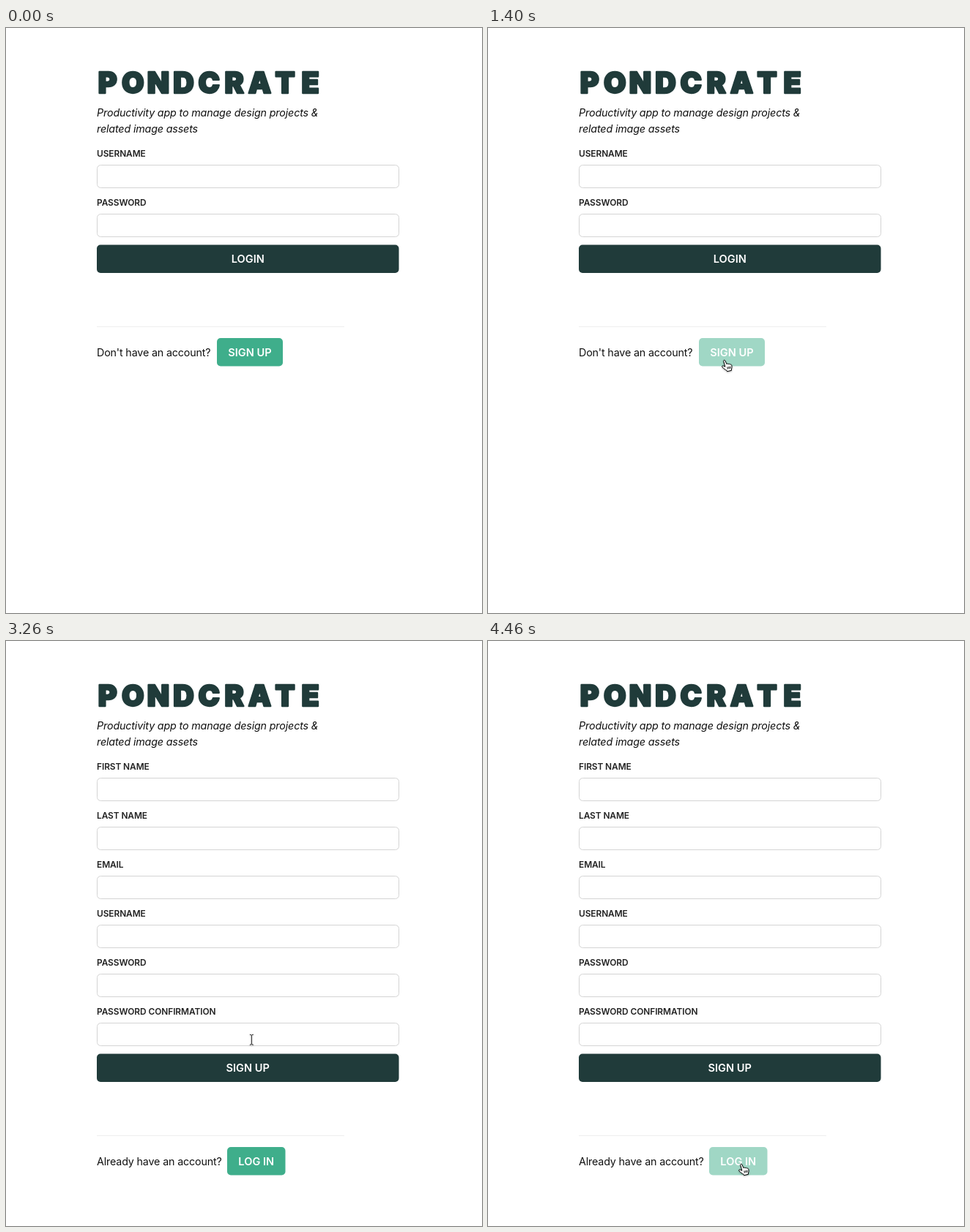
An HTML page for the animation above (4.62 s loop, 650 px wide and 800 px high).

```html
<!DOCTYPE html>
<html lang="en">
<head>
<meta charset="utf-8">
<title>Sign in</title>
<style>
html, body { margin: 0; width: 100%; height: 100%; overflow: hidden; background: #fff; }
svg { display: block; width: 650px; height: 800px; font-family: Inter, "Open Sans", sans-serif; cursor: default; }
.title { font-weight: 900; font-size: 39.5px; text-anchor: middle; fill: #203b3a; stroke: #203b3a; stroke-width: 2.4; stroke-linejoin: round; }
.body { font-size: 14.3px; letter-spacing: -0.16px; fill: #111; }
.tagline { font-style: italic; }
.label { font-size: 11.9px; font-weight: 600; letter-spacing: -0.07px; fill: #222; }
.field { fill: #fff; stroke: #d4d4d4; }
.action { font-size: 14.6px; font-weight: 600; text-anchor: middle; fill: #fff; }
.rule { stroke: #eee; }
.hover { opacity: 0.49; }
</style>
</head>
<body>
<svg id="stage" viewBox="0 0 650 800"></svg>
<script>
const LOOP = 4620, STEP = 20;
const ENTER = 660, CLICK = 2060, SWAP = 2100;
const stage = document.getElementById('stage');

function add(parent, tag, attrs, text) {
  const el = document.createElementNS('http://www.w3.org/2000/svg', tag);
  for (const k in attrs) el.setAttribute(k, attrs[k]);
  if (text) el.textContent = text;
  parent.appendChild(el);
  return el;
}

function write(parent, cls, x, y, text) {
  return add(parent, 'text', { class: cls, x, y }, text);
}

function button(parent, x, y, width, fill, text) {
  const height = 38.5, el = add(parent, 'g', {});
  add(el, 'rect', { x, y, width, height, rx: 5, fill });
  write(el, 'action', x + width / 2, y + 24.8, text);
  return { el, x, y, width, height };
}

function buildPage(labels, submit, prompt, link, linkX, linkWidth) {
  const el = add(stage, 'g', {}), end = labels.length * 67;
  const fields = labels.map((label, i) => {
    const box = { x: 124.5, y: 187.5 + 67 * i, width: 412, height: 31 };
    write(el, 'label', 124, 175.7 + 67 * i, label);
    add(el, 'rect', { ...box, rx: 5, class: 'field' });
    return box;
  });
  add(el, 'line', { class: 'rule', x1: 124, x2: 462, y1: end + 274.5, y2: end + 274.5 });
  write(el, 'body', 124, end + 314.8, prompt);
  const buttons = [
    button(el, 124, end + 162.5, 412.5, '#203b3a', submit),
    button(el, linkX, end + 290, linkWidth, '#3fae8b', link)
  ];
  return { el, fields, buttons };
}

// Heading: each letter is centred in an equal cell
const name = 'PONDCRATE';
add(stage, 'text', { class: 'title', y: 89, x: [...name].map((c, i) => 138.8 + 34.6 * i).join(' ') }, name);
write(stage, 'body tagline', 124, 120.8, 'Productivity app to manage design projects &');
write(stage, 'body tagline', 124, 142.8, 'related image assets');

const login = buildPage(['USERNAME', 'PASSWORD'], 'LOGIN',
  "Don't have an account?", 'SIGN UP', 288, 90);
const signup = buildPage(
  ['FIRST NAME', 'LAST NAME', 'EMAIL', 'USERNAME', 'PASSWORD', 'PASSWORD CONFIRMATION'],
  'SIGN UP', 'Already have an account?', 'LOG IN', 302, 79.5);

// Pointer shapes, each with its hot spot at 0,0
const pointer = add(stage, 'g', { style: 'filter: drop-shadow(0 1px 1px rgba(0,0,0,.3))' });
const shapes = {
  arrow: add(pointer, 'path', {
    d: 'M0 0V11.8L2.7 9.2L4.6 13.7L6.5 12.9L4.6 8.5H8.4Z',
    fill: '#000', stroke: '#fff', 'stroke-width': 1.4, 'paint-order': 'stroke'
  }),
  hand: add(pointer, 'path', {
    transform: 'translate(-4 -1.3)',
    d: 'M2.7 1.9C2.3 .5 4.3 -.1 4.9 1.3L6.8 5.9C7.4 5.1 8.8 5.1 9.2 6.1C10 5.4 11.2 5.6 11.6 6.5' +
       'C12.5 6 13.6 6.6 13.8 7.8C14.2 10 14 11.8 13.3 13.3L13.5 14.6L7.6 16L7 14.6' +
       'C5 13.8 3 12 1 10.2C0 9 1 7.8 2.3 8.3L4.9 9.6Z' +
       'M7.8 9.8L8.4 12.8M9.7 9.4L10.3 12.4M11.6 9L12.1 12',
    fill: '#fff', stroke: '#000', 'stroke-width': 1, 'stroke-linejoin': 'round'
  }),
  beam: add(pointer, 'path', {
    d: 'M-2.5 -7Q0 -7 0 -5.5Q0 -7 2.5 -7M0 -5.5V5.5M-2.5 7Q0 7 0 5.5Q0 7 2.5 7',
    fill: 'none', stroke: '#222'
  })
};

// Pointer path: time, x, y
const path = [
  [660, 343, 797], [800, 318, 698], [1000, 288, 570], [1100, 286, 525],
  [1180, 288.5, 486], [1260, 302, 464], [1400, 323, 455], [1720, 326, 453],
  [2060, 332, 441.5], [2400, 332, 441.5], [2740, 329.5, 447], [2940, 331, 450],
  [3060, 334, 468], [3180, 335, 509], [3300, 335.5, 565], [3420, 336, 628],
  [3460, 337, 652], [3600, 341, 693], [3760, 344, 712], [4000, 345.5, 716], [4460, 346, 716]
];

const slope = (i, k) => (path[i + 1][k] - path[i][k]) / (path[i + 1][0] - path[i][0]);

function tangent(i, k) {
  if (i === 0) return slope(0, k);
  if (i === path.length - 1) return 0;
  const a = slope(i - 1, k), b = slope(i, k);
  return a * b > 0 ? 2 * a * b / (a + b) : 0;
}

// Monotone cubic between path points
function along(t, k) {
  const last = path.length - 1;
  if (t >= path[last][0]) return path[last][k];
  let i = 0;
  while (t >= path[i + 1][0]) i++;
  const h = path[i + 1][0] - path[i][0], u = (t - path[i][0]) / h, v = 1 - u;
  return path[i][k] * (1 + 2 * u) * v * v + path[i + 1][k] * u * u * (3 - 2 * u) +
    h * u * v * (tangent(i, k) * v - tangent(i + 1, k) * u);
}

const inside = (b, x, y) => x >= b.x && x <= b.x + b.width && y >= b.y && y <= b.y + b.height;
const show = (el, on) => el.setAttribute('display', on ? 'inline' : 'none');

function draw(t) {
  const page = t < SWAP ? login : signup;
  const visible = t >= ENTER;
  const x = visible ? along(t, 1) : -50, y = visible ? along(t, 2) : -50;
  let kind = 'arrow';
  show(login.el, page === login);
  show(signup.el, page === signup);
  if (page.fields.some(f => inside(f, x, y))) kind = 'beam';
  for (const b of page.buttons) {
    const over = inside(b, x, y);
    b.el.classList.toggle('hover', over);
    if (over) kind = 'hand';
  }
  if (t >= CLICK && t < SWAP) kind = 'arrow';
  for (const k in shapes) show(shapes[k], k === kind);
  show(pointer, visible);
  pointer.setAttribute('transform', `translate(${x.toFixed(2)} ${y.toFixed(2)})`);
}

const start = performance.now();
function tick() {
  const t = (performance.now() - start) % LOOP;
  draw(Math.floor(t / STEP) * STEP);
  requestAnimationFrame(tick);
}
draw(0);
requestAnimationFrame(tick);
</script>
</body>
</html>
```
